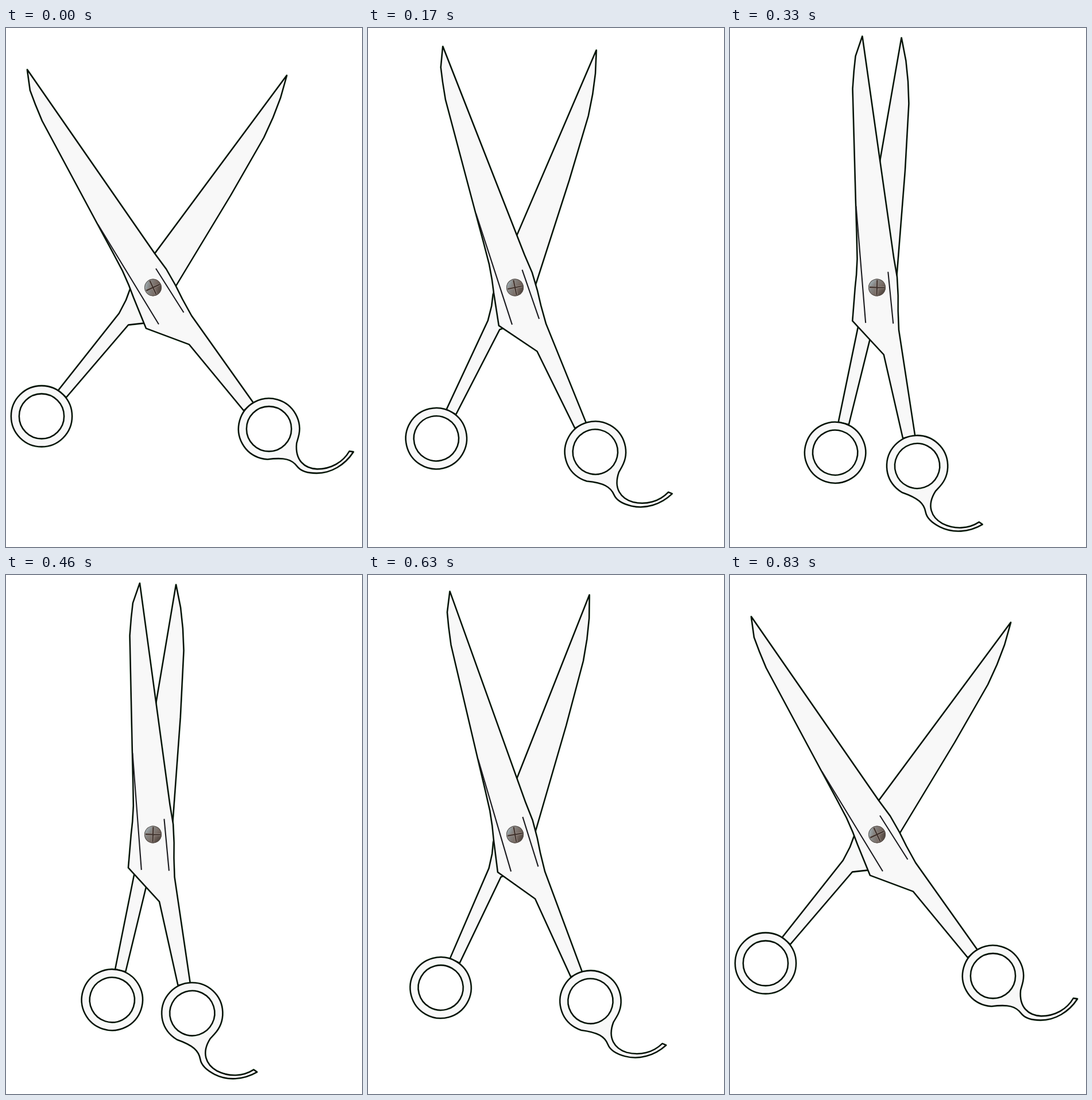
Recreate the animation shown at these times as an HTML page with a canvas. Size 620 by 903 pixels, loop 1000 ms.

```html
<!DOCTYPE html>
<html lang="en">
<head>
<meta charset="utf-8">
<title>Scissors</title>
<style>
  html, body { margin: 0; width: 100%; height: 100%; overflow: hidden; background: #fff; }
  canvas { display: block; }
</style>
</head>
<body>
<canvas id="stage" width="620" height="903"></canvas>
<script>
const ctx = document.getElementById('stage').getContext('2d');
const LOOP = 1000, FPS = 24, OPEN = 30;
const PIVOT = { x: 256, y: 451 };
const STEEL = '#f8f8f8', INK = '#040c05', FRINGE = 'rgba(0,75,10,.5)';

// All shapes are laid out in the fully open pose.
const backBlade = new Path2D(
  'M489 82 L259 392 L216 454 L209 473 L197 496 L91 630 L105 642 L213 516 L240 513' +
  ' L270 490 L296 448 L391 291 L449 190 L465 155 L478 121 Z');
const frontBlade = new Path2D(
  'M37 72 L259 392 L279 419 L295 447 L307 471 L323 500 L431 652 L414 665 L319 550' +
  ' L244 522 L222 468 L214 447 L203 422 L185 388 L158 338 L63 161 L51 132 L42 108 Z');
const grooves = new Path2D('M160 341 L266 515 M261 418 L309.500 494.500');

function circle(x, y, r) {
  const path = new Path2D();
  path.arc(x, y, r, 0, 7);
  return path;
}

// Finger ring with its curved rest.
const frontRing = new Path2D();
frontRing.arc(458, 697, 53, 0.28, 1.62, true);
frontRing.bezierCurveTo(485, 746, 498, 750, 507, 762);
frontRing.bezierCurveTo(513, 770, 525, 774, 541, 774);
frontRing.bezierCurveTo(566, 774, 590, 760, 605, 737);
frontRing.lineTo(598, 736);
frontRing.bezierCurveTo(587, 755, 566, 767, 542, 767);
frontRing.bezierCurveTo(520, 766, 503, 752, 506, 722);
frontRing.closePath();

function shape(path, fill = STEEL) {
  ctx.lineWidth = 3.3;
  ctx.strokeStyle = FRINGE;
  ctx.stroke(path);
  ctx.fillStyle = fill;
  ctx.fill(path);
  ctx.lineWidth = 2.3;
  ctx.strokeStyle = INK;
  ctx.stroke(path);
}

function screw() {
  const { x, y } = PIVOT;
  const metal = ctx.createLinearGradient(x - 15, y - 3, x + 15, y + 3);
  metal.addColorStop(0, '#a3b0b5');
  metal.addColorStop(0.3, '#858482');
  metal.addColorStop(0.65, '#786b64');
  metal.addColorStop(1, '#4c413b');
  ctx.fillStyle = metal;
  ctx.fill(circle(x, y, 15));
  ctx.strokeStyle = '#554d48';
  ctx.lineWidth = 1;
  ctx.stroke(circle(x, y, 14.6));

  ctx.save();
  ctx.translate(x, y);
  ctx.rotate(-25 * Math.PI / 180);
  const cross = new Path2D('M-13 0 H13 M0 -13 V13');
  for (const [width, color] of [[4, '#948983'], [2, '#3d302b']]) {
    ctx.lineWidth = width;
    ctx.strokeStyle = color;
    ctx.stroke(cross);
  }
  ctx.restore();
}

function turned(degrees, paint) {
  ctx.save();
  ctx.translate(PIVOT.x, PIVOT.y);
  ctx.rotate(degrees * Math.PI / 180);
  ctx.translate(-PIVOT.x, -PIVOT.y);
  paint();
  ctx.restore();
}

function paintBack() {
  shape(backBlade);
  shape(circle(62, 675, 53));
  shape(circle(62, 675, 39), '#fff');
}

function paintFront() {
  shape(frontBlade);
  shape(frontRing);
  shape(circle(458, 697, 39), '#fff');
  ctx.strokeStyle = '#1b1b1f';
  ctx.lineWidth = 2.1;
  ctx.stroke(grooves);
  screw();
}

// Closes over steps 0-9, rests one step, opens over steps 10-20, then holds.
function openAngle(step) {
  if (step <= 9) return OPEN * (1 - step / 9);
  return OPEN * Math.min(1, (step - 10) / 10);
}

function draw(ms) {
  const tick = Math.floor((ms % LOOP) / 10) * 10;
  const step = Math.floor((tick + 4.9) * FPS / 1000);
  const closed = OPEN - openAngle(step);
  ctx.setTransform(1, 0, 0, 1, 0, 0);
  ctx.fillStyle = '#fff';
  ctx.fillRect(0, 0, 620, 903);
  ctx.translate(0, 0.5);
  ctx.lineJoin = 'round';
  turned(-closed, paintBack);
  turned(closed, paintFront);
}

const start = performance.now();
function loop() {
  draw(performance.now() - start);
  requestAnimationFrame(loop);
}
loop();
</script>
</body>
</html>
```
